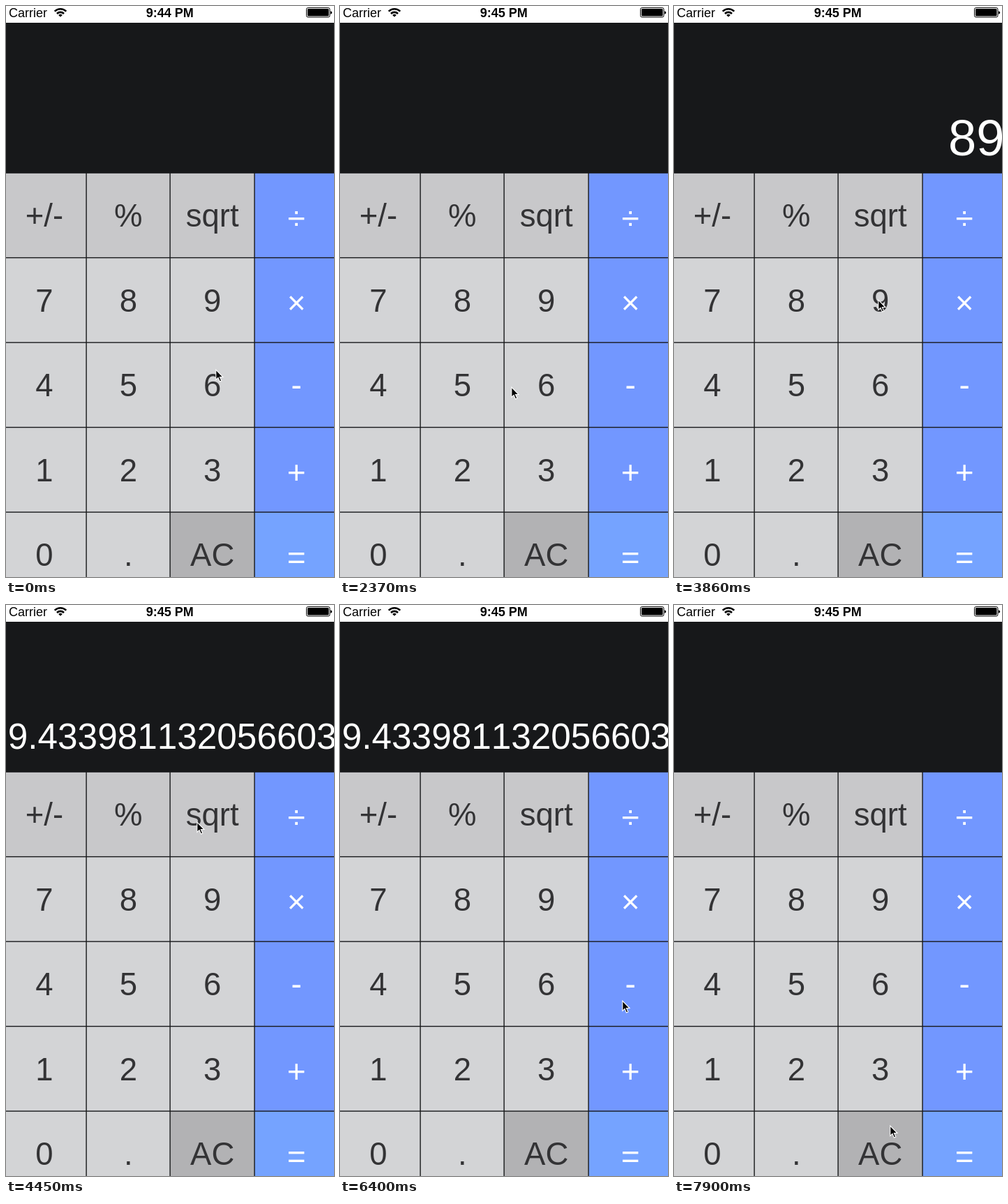
These frames come from a looping animation (470x818 px, 8000 ms). An HTML page:

```html
<!DOCTYPE html>
<html lang="en">
<head>
<meta charset="utf-8">
<title>Calculator</title>
<style>
  html, body { margin: 0; width: 100%; height: 100%; overflow: hidden; background: #17181a; }
  svg { display: block; width: 470px; height: 818px; font-family: "Liberation Sans", Arial, sans-serif; font-kerning: none; }
  .key { font-size: 45.5px; fill: #333335; text-anchor: middle; }
  .op { font-size: 46px; fill: #fff; }
  .status { font-size: 18px; fill: #000; }
  #clock { font-weight: bold; text-anchor: middle; }
  #readout { fill: #fff; text-anchor: end; dominant-baseline: alphabetic; }
</style>
</head>
<body>
<svg viewBox="0 0 470 818">
  <rect width="470" height="818" fill="#17181a"/>
  <rect width="470" height="24" fill="#fff"/>
  <text class="status" x="4" y="15.7">Carrier</text>
  <g fill="none" stroke="#000" stroke-width="2.6">
    <path d="M69.7 7.6A11.8 11.8 0 0 1 86.3 7.6"/>
    <path d="M73 11A7 7 0 0 1 83 11"/>
    <path d="M78 15.8L75.2 13A4 4 0 0 1 80.8 13Z" fill="#000" stroke="none"/>
  </g>
  <text class="status" id="clock" x="234.7" y="15.7"></text>
  <rect x="430.5" y="2.5" width="33.5" height="13.5" rx="2.2" fill="none" stroke="#000"/>
  <rect x="432" y="4" width="30.5" height="10.5" rx="1"/>
  <path d="M465 7.2Q467.2 7.6 467.2 9.5T465 11.8Z"/>
  <text id="readout" x="473.5"></text>
  <g id="keys"></g>
  <path id="cursor" d="M.8 1.2V15.4L4 12.4L6.4 18L8.8 17L6.4 11.5H11Z" stroke="#fff" stroke-width="1.1"/>
</svg>
<script>
const LOOP = 8000, TICK = 148;
const PITCH_X = 120.4, PITCH_Y = 121.5, GAP = 1.4;
const rows = ['+/- % sqrt ÷', '7 8 9 ×', '4 5 6 -', '1 2 3 +', '0 . AC ='];

// Pointer strokes: a smooth curve through a few points, sampled once per tick.
const strokes = [
  { start: 0, ticks: 8, points: [[300, 520], [272, 556], [290, 448], [317, 469], [330, 461]] },
  { start: 1330, ticks: 2, points: [[322, 590], [303, 659], [318, 589]] },
  { start: 2370, ticks: 5, points: [[245, 545], [178, 470], [187, 433]] },
  { start: 3560, ticks: 4, points: [[293, 423], [292, 420], [273, 310]] },
  { start: 5800, ticks: 9, points: [[271, 314], [390, 537], [397, 597], [320, 745]] },
  { start: 7750, ticks: 1, points: [[315, 745], [309, 745]] }
];
const presses = [[3410, '8'], [3860, '9'], [4450, 'sqrt'], [7450, 'AC']];

const $ = id => document.getElementById(id);

function add(tag, attrs, text = '') {
  const el = document.createElementNS('http://www.w3.org/2000/svg', tag);
  for (const name in attrs) el.setAttribute(name, attrs[name]);
  el.textContent = text;
  $('keys').append(el);
}

function fillFor(label, row, col) {
  if (label === '=') return '#75a3ff';
  if (label === 'AC') return '#b2b2b4';
  if (col === 3) return '#7297ff';
  return row ? '#d3d4d6' : '#c8c8ca';
}

const left = col => Math.floor(PITCH_X * col - 5) + 0.8;

rows.forEach((line, row) => line.split(' ').forEach((label, col) => {
  const y = 239.8 + row * PITCH_Y;
  const drop = '÷×+='.includes(label) ? 3.4 : 0;
  add('rect', {
    x: left(col), y, width: left(col + 1) - left(col) - GAP,
    height: PITCH_Y - GAP, fill: fillFor(label, row, col)
  });
  add('text', { class: col === 3 ? 'key op' : 'key', x: 54.9 + col * PITCH_X, y: y + 76.6 + drop }, label);
}));

// Catmull-Rom curve through the points, u from 0 to 1.
function curve(points, u) {
  const last = points.length - 1;
  const i = Math.min(Math.floor(u * last), last - 1), f = u * last - i;
  const p = n => points[Math.max(0, Math.min(last, n))];
  return [0, 1].map(k => {
    const [a, b, c, d] = [p(i - 1)[k], p(i)[k], p(i + 1)[k], p(i + 2)[k]];
    return b + f / 2 * (c - a + f * (2 * a - 5 * b + 4 * c - d + f * (3 * (b - c) + d - a)));
  });
}

function pointer(t) {
  const { start, ticks, points } = strokes.findLast(s => s.start <= t);
  const n = Math.min(ticks, Math.floor((t - start) / TICK));
  return curve(points, n / ticks).map(Math.round);
}

function press(value, key) {
  if (key === 'AC') return '';
  return key === 'sqrt' ? String(Math.sqrt(value)) : value + key;
}

function draw(now) {
  const t = now % LOOP;
  const value = presses.filter(p => p[0] <= t).reduce((v, p) => press(v, p[1]), '');
  const long = value.length > 6;
  $('cursor').setAttribute('transform', `translate(${pointer(t)})`);
  $('clock').textContent = t < 2370 ? '9:44 PM' : '9:45 PM';
  $('readout').textContent = value;
  $('readout').setAttribute('font-size', long ? 51.3 : 72.3);
  $('readout').setAttribute('y', long ? 206.3 : 213.6);
  requestAnimationFrame(draw);
}
draw(performance.now());
</script>
</body>
</html>
```
